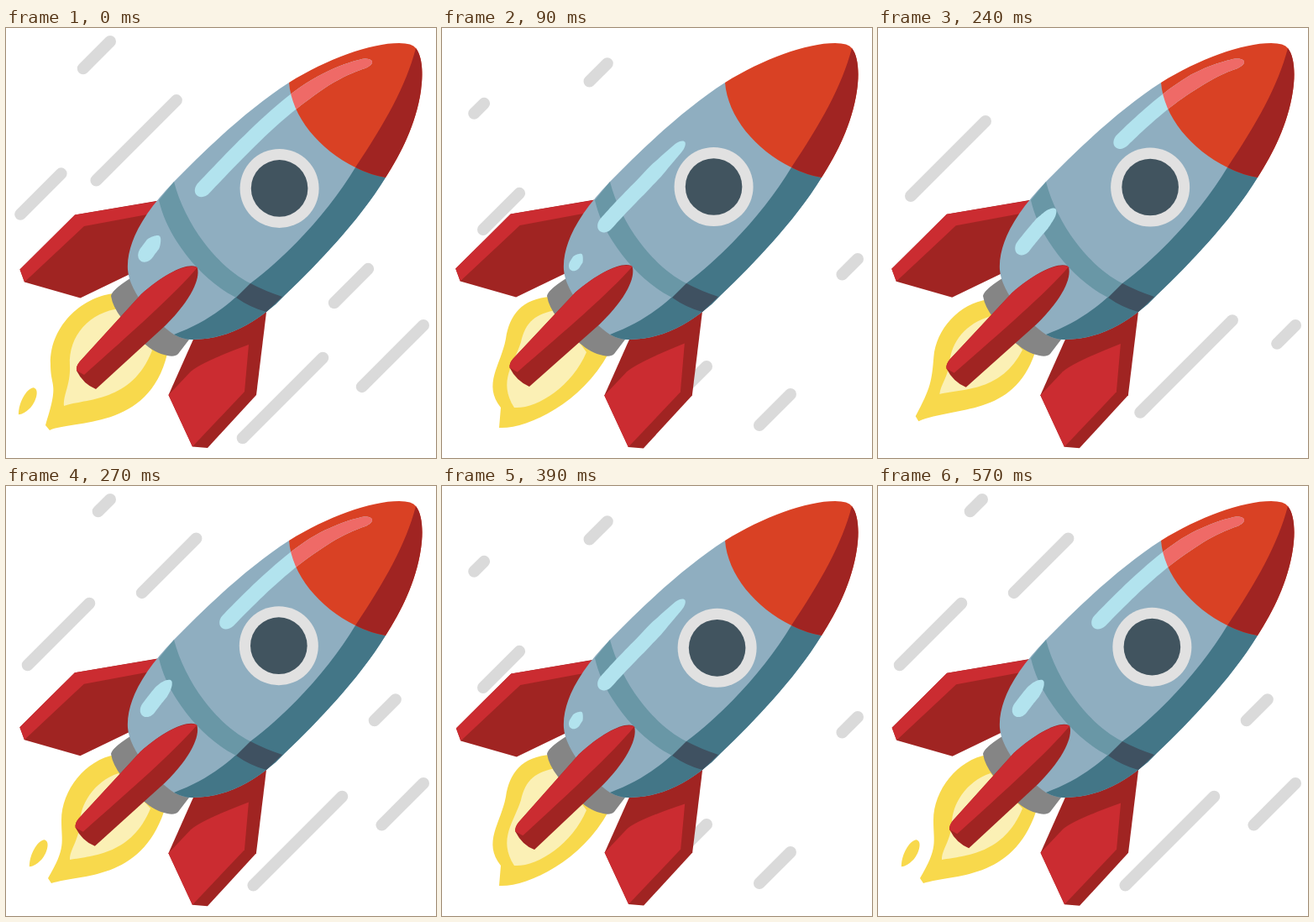
An HTML page that plays this animation: 512x512 px, repeating every 0.6 s.

```html
<!DOCTYPE html>
<html lang="en">
<head>
<meta charset="utf-8">
<title>Rocket</title>
<style>
  html, body { margin: 0; width: 100%; height: 100%; overflow: hidden; background: #fff; }
  svg { display: block; width: 100%; height: 100%; }
</style>
</head>
<body>
<svg viewBox="0 0 512 512">
  <defs>
    <path id="noseShape" d="M337 65C382 37 434 18 468 18Q484 18 488 24C496 34 497 55 494 75C488 115 470 150 452 178Q434 175 416 166C373 145 340 105 337 65Z"/>
    <clipPath id="noseClip"><use href="#noseShape"/></clipPath>
    <path id="glintLine" d="M436 40C370 54 316 105 236 190C200 226 168 262 152 292"/>
  </defs>

  <g id="streaks" stroke="#dadada" stroke-width="14" stroke-linecap="round"></g>

  <g id="leftFin">
    <path fill="#a02422" d="M182 205.500L82 222.500L16.500 287.500L22 302.500L88.500 321.500L160 287L195 220Z"/>
    <path fill="#cb2c31" d="M190 204.500L82 222.500L16.500 287.500L22 302.500L93 236L190 218Z"/>
  </g>
  <g id="rightFin">
    <path fill="#a02422" d="M311 330L298 437L240 500L222 498.500L193.500 437L226 364Z"/>
    <path id="rightFace" fill="#cb2c31"/>
  </g>

  <path id="flame" fill="#f8d94c"/>
  <path id="flameCore" fill="#fbf0b5"/>
  <g id="drops" fill="#f8d94c"></g>

  <path fill="#858585" d="M148 298Q126 312 125 319Q127 332 138 346C155 369 172 386 192 390Q201 392 205 388L218 371L180 330Z"/>

  <path fill="#8faec0" d="M337 65C290 95 240 142 200 183C162 222 143 258 145 288C147 315 178 350 200 365Q211 371 222 371C262 371 292 352 310 338Q322 329 332 318C375 277 422 227 452 178L416 166Z"/>
  <path fill="#437687" d="M416 166C386 216 339 268 291 304C260 335 235 352 200 365Q211 371 222 371C262 371 292 352 310 338Q322 329 332 318C375 277 422 227 452 178Z"/>
  <path fill="#6997a6" d="M200 183C212 230 248 282 291 304L274 321C232 300 192 250 182 205Z"/>
  <path fill="#3f5161" d="M291 304Q308 313 329 320L310 338Q291 333 274 321Z"/>
  <use href="#noseShape" fill="#d94124"/>
  <path fill="#a02422" d="M488 24C496 34 497 55 494 75C488 115 470 150 452 178Q434 175 416 166C450 115 476 70 488 24Z"/>

  <path id="glints" fill="#b2e3ee"/>
  <path id="noseGlints" fill="#ef6a67" clip-path="url(#noseClip)"/>

  <g id="porthole">
    <circle cx="325.6" cy="190.9" r="47" fill="#e1e1e1"/>
    <circle cx="325.6" cy="190.9" r="33.8" fill="#41545f"/>
  </g>

  <g id="midFin">
    <path fill="#a02422" d="M226 284C214 280 188 293 161 317L88 397Q83 403 84 408Q92 424 107 430L190 354C222 322 231 298 228 286Z"/>
    <path fill="#cb2c31" d="M228 285C214 280 188 293 161 317L88 397Q83 403 84 408L93 413C150 362 200 318 228 285Z"/>
  </g>
</svg>

<script>
const LOOP = 600, BEAT = 300, STEP = 30;
const NS = "http://www.w3.org/2000/svg";
const $ = id => document.getElementById(id);
const clamp = v => Math.min(1, Math.max(0, v));
const mod = (v, n) => ((v % n) + n) % n;
const mix = (a, b, p) => a + (b - a) * p;
const add = (parent, tag) => parent.appendChild(document.createElementNS(NS, tag));

// Linear progress bent outwards (bend > 0) or inwards (bend < 0).
const bent = (p, bend) => (p = clamp(p), p + bend * p * (1 - p));

function along(keys, t) {
  if (t <= keys[0][0]) return keys[0][1];
  for (let i = 1; i < keys.length; i++) {
    const [t0, v0] = keys[i - 1], [t1, v1] = keys[i];
    if (t <= t1) return mix(v0, v1, (t - t0) / (t1 - t0));
  }
  return keys[keys.length - 1][1];
}

// Each streak runs down a diagonal x + y = sum, its head drawing it and its tail erasing it.
// head: [duration, bend], tail: [delay, duration, bend]
const streaks = [
  { sum: 140, from: 124, to: 37, start: 246, head: [146, 0], tail: [54, 106, 0] },
  { sum: 289, from: 234, to: 49, start: 240, head: [137, 1], tail: [18, 158, -.5] },
  { sum: 239, from: 197, to: 13, start: 74, head: [266, 1], tail: [8, 258, -1] },
  { sum: 718, from: 475, to: 290, start: 250, head: [146, .5], tail: [9, 148, -.2] },
  { sum: 851, from: 497, to: 372, start: 219, head: [195, .7], tail: [81, 120, -.5] },
  { sum: 770, from: 495, to: 272, start: 78, head: [268, .9], tail: [42, 300, -.3] }
].map(s => ({ ...s, el: add($("streaks"), "line") }));

function drawStreak({ sum, from, to, start, head, tail, el }, t) {
  const age = mod(t - start, BEAT);
  const h = bent(age / head[0], head[1]);
  const b = bent((age - tail[0]) / tail[1], tail[2]);
  el.style.display = h - b > .005 ? "" : "none";
  [b, h].forEach((p, i) => {
    const x = mix(from, to, p);
    el.setAttribute("x" + (i + 1), x);
    el.setAttribute("y" + (i + 1), sum - x);
  });
}

// Flame poses at 0, 90, 180 and 270 ms.
const poseTimes = [0, 90, 180, 270, 300];
const flamePoses = [
  "M130 316C95 318 52 352 53 400C53 430 64 420 47 473L52 479C80 466 170 480 192 388Z",
  "M130 320C95 322 80 342 76 370C70 402 48 424 70 452L68 476C100 478 165 448 198 388Z",
  "M132 330C100 332 75 352 67 380C60 410 45 425 34 453L37 459C100 425 162 450 184 386Z",
  "M130 320C95 326 66 362 66 398C66 425 72 430 50 467L54 473C90 462 160 470 188 388Z"
];
const corePoses = [
  "M136 334C100 338 74 366 76 402C77 425 68 436 69 450C95 441 150 446 174 384Z",
  "M136 336C112 340 99 350 94 374C86 400 66 420 86 452C112 454 154 428 172 386Z",
  "M134 346C106 350 86 362 80 390C78 400 72 408 68 418C100 408 140 422 172 382Z",
  "M134 342C104 352 88 380 88 402C86 424 76 432 76 445C105 440 150 438 172 384Z"
];

function morph(poses, t) {
  const i = Math.min(3, Math.floor(t / 90));
  const p = (t - poseTimes[i]) / (poseTimes[i + 1] - poseTimes[i]);
  const next = poses[(i + 1) % 4].match(/\d+/g);
  let n = 0;
  return poses[i].replace(/\d+/g, v => mix(+v, +next[n++], p).toFixed(1));
}

const drops = [
  { start: 260, life: 80, at: 270, x: 39, y: 438, vx: -.43, vy: .23, turn: -54, size: .95 },
  { start: 150, life: 85, at: 180, x: 78, y: 462, vx: -.5, vy: .35, turn: -24, size: 1.35 }
].map(d => ({ ...d, el: add($("drops"), "path") }));
for (const { el } of drops)
  el.setAttribute("d", "M-20 0C-8-9 12-11 18-5C22 2 8 8-4 7Q-16 5-20 0Z");

function drawDrop(d, t) {
  const age = mod(t - d.start, BEAT);
  const dt = age - (d.at - d.start);
  const size = d.size * clamp((d.life - age) / 30);
  d.el.style.display = size > 0 ? "" : "none";
  d.el.setAttribute("transform",
    `translate(${d.x + d.vx * dt} ${d.y + d.vy * dt}) rotate(${d.turn}) scale(${size} ${Math.min(1, size)})`);
}

// A glint lives for more than two beats, so up to three overlap.
const glintHead = [[90, 0], [180, .29], [270, .58], [300, .69], [390, .84], [480, .9], [570, .945], [690, .99], [720, 1]];
const glintTail = [[300, 0], [390, .46], [480, .635], [570, .805], [600, .86], [690, .93], [720, 1]];
const glintLine = $("glintLine"), glintLength = glintLine.getTotalLength();

function glintPath(age) {
  const a = along(glintTail, age) * glintLength, b = along(glintHead, age) * glintLength;
  if (b - a < 2) return "";
  const radius = Math.min(9, (b - a) * .29), count = 48, left = [], right = [];
  const cap = d => Math.sqrt(1 - (1 - clamp(d / radius / 1.3)) ** 2);
  for (let i = 0; i <= count; i++) {
    const v = (1 - Math.cos(Math.PI * i / count)) / 2, s = mix(a, b, v);
    const p = glintLine.getPointAtLength(s);
    const p0 = glintLine.getPointAtLength(s - 1), p1 = glintLine.getPointAtLength(s + 1);
    const angle = Math.atan2(p1.y - p0.y, p1.x - p0.x);
    const w = radius * (.6 + .4 * clamp(3 * v)) * cap(s - a) * cap(b - s);
    const dx = Math.sin(angle) * w, dy = -Math.cos(angle) * w;
    left.push(`${(p.x + dx).toFixed(1)} ${(p.y + dy).toFixed(1)}`);
    right.unshift(`${(p.x - dx).toFixed(1)} ${(p.y - dy).toFixed(1)}`);
  }
  return `M${left.concat(right).join("L")}Z`;
}

function drawSway(s) {
  const shift = (id, x, y) => $(id).setAttribute("transform", `translate(${x * s} ${y * s})`);
  shift("porthole", 2.5, 2.4);
  shift("leftFin", .4, 1.1);
  shift("rightFin", .2, -.6);
  const k = .019 * s;
  $("midFin").setAttribute("transform", `matrix(${1 - k} ${-k} 0 1 ${5.8 * s} ${5.8 * s})`);
  const ridge = 377 + 2.5 * s;
  $("rightFace").setAttribute("d",
    `M289 ${ridge}L284 433L222 498.5L193.5 437L220 409Q232 398 289 ${ridge}Z`);
}

function draw(t) {
  const beat = t % BEAT;
  streaks.forEach(s => drawStreak(s, beat));
  drops.forEach(d => drawDrop(d, beat));
  $("flame").setAttribute("d", morph(flamePoses, beat));
  $("flameCore").setAttribute("d", morph(corePoses, beat));
  const glints = [0, 1, 2].map(n => glintPath(beat + n * BEAT)).join("");
  $("glints").setAttribute("d", glints);
  $("noseGlints").setAttribute("d", glints);
  drawSway(-Math.sin(2 * Math.PI * t / LOOP));
}

const begin = performance.now();
function tick() {
  const t = mod(performance.now() - begin, LOOP);
  draw(Math.floor(t / STEP) * STEP);
  requestAnimationFrame(tick);
}
tick();
</script>
</body>
</html>
```
